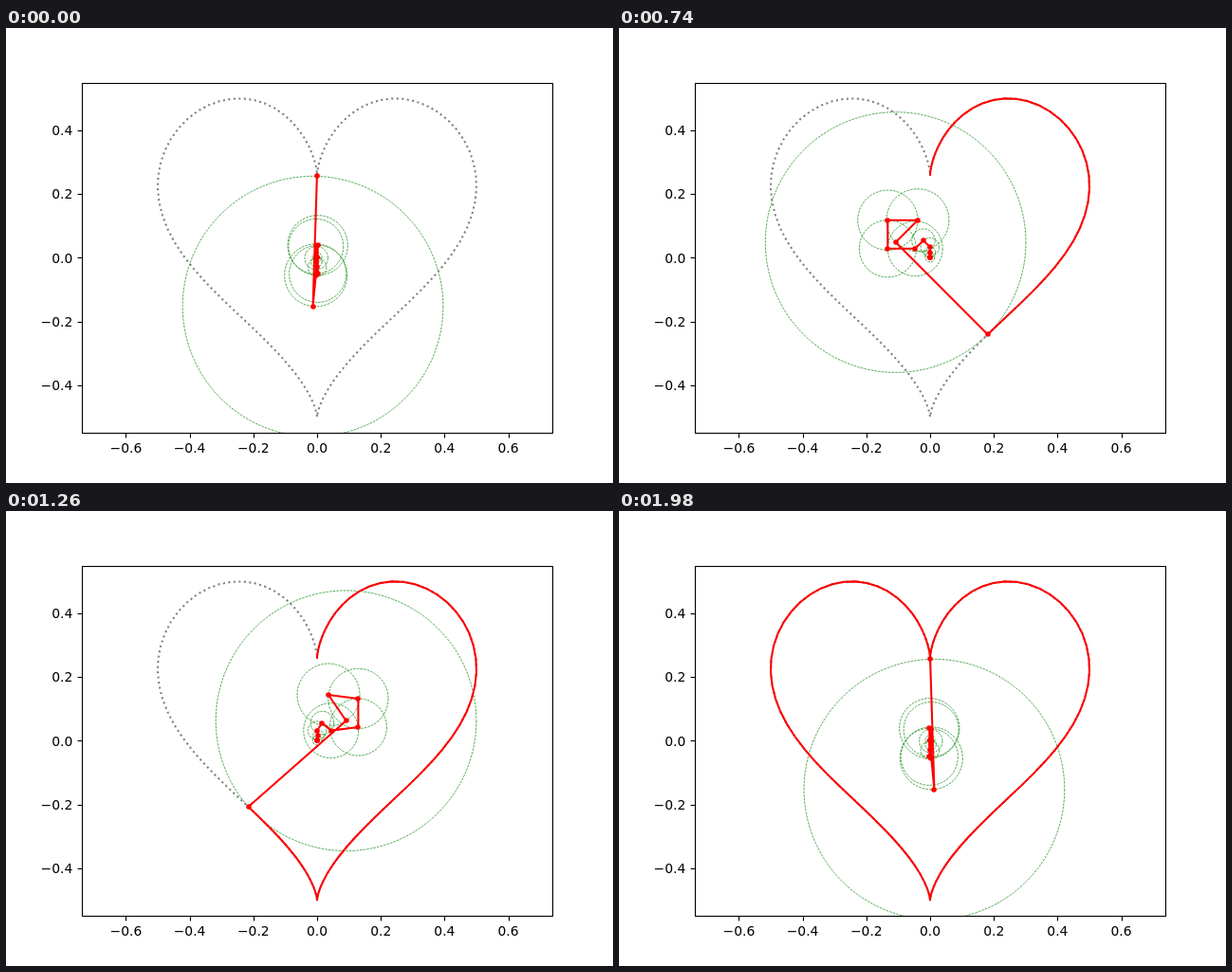
An HTML page that plays this animation: 640x480 px, repeating every 2 s.

```html
<!DOCTYPE html>
<html lang="en">
<head>
<meta charset="utf-8">
<title>Heart drawn by epicycles</title>
<style>
  html, body { margin: 0; width: 100%; height: 100%; overflow: hidden; background: #fff; }
  svg { display: block; }
  text { font: 13.89px "DejaVu Sans", sans-serif; }
  .line { fill: none; stroke: red; stroke-width: 2.08; stroke-linejoin: round; stroke-linecap: square; }
  .axis { fill: none; stroke: #000; stroke-width: 1.11; }
</style>
</head>
<body>
<svg id="stage" width="640" height="480" viewBox="0 0 640 480">
  <defs><clipPath id="plot"><rect x="80" y="57.6" width="496" height="369.6"/></clipPath></defs>
  <g id="chart" clip-path="url(#plot)"></g>
  <g id="axes"><rect class="axis" x="80.5" y="58.5" width="496" height="369"/></g>
</svg>
<script>
const STEPS = 100, STEP_MS = 20, ORDER = 5, SCALE = 336;
const TAU = 2 * Math.PI;
const px = x => 328 + x * SCALE;
const py = y => 242.4 - y * SCALE;
const chart = document.getElementById('chart');
const axes = document.getElementById('axes');

function add(parent, tag, attrs) {
  const el = document.createElementNS('http://www.w3.org/2000/svg', tag);
  for (const name in attrs) el.setAttribute(name, attrs[name]);
  return parent.appendChild(el);
}

const polyline = points =>
  points.map(([x, y]) => px(x).toFixed(2) + ',' + py(y).toFixed(2)).join(' ');

// Stretch values to the range -0.5 to 0.5.
function normalise(values) {
  const low = Math.min(...values), high = Math.max(...values);
  return values.map(v => (v - low) / (high - low) - 0.5);
}

const angles = Array.from({ length: STEPS }, (_, k) => TAU * k / (STEPS - 1));
const xs = normalise(angles.map(t => 16 * Math.sin(t) ** 3));
const ys = normalise(angles.map(t =>
  13 * Math.cos(t) - 5 * Math.cos(2 * t) - 2 * Math.cos(3 * t) - Math.cos(4 * t)));
const heart = xs.map((x, k) => [x, ys[k]]);

// Discrete Fourier coefficient for one frequency, in polar form.
function coefficient(freq) {
  let re = 0, im = 0;
  heart.forEach(([x, y], k) => {
    const a = -TAU * freq * k / STEPS;
    re += x * Math.cos(a) - y * Math.sin(a);
    im += x * Math.sin(a) + y * Math.cos(a);
  });
  return { freq, radius: Math.hypot(re, im) / STEPS, phase: Math.atan2(im, re) };
}

const arms = Array.from({ length: 2 * ORDER + 1 }, (_, i) => coefficient(i - ORDER))
  .sort((a, b) => a.radius - b.radius);

const circles = arms.map(arm => add(chart, 'circle', {
  r: arm.radius * SCALE, fill: 'none', stroke: 'green',
  'stroke-width': 0.69, 'stroke-dasharray': '2.57 1.11'
}));
add(chart, 'polyline', {
  points: polyline(heart), fill: 'none', stroke: 'gray', 'stroke-width': 2.08,
  'stroke-dasharray': '2.08 3.44', 'stroke-linejoin': 'round'
});
const trace = add(chart, 'polyline', { class: 'line' });
const chain = add(chart, 'polyline', { class: 'line' });
const dots = Array.from({ length: arms.length + 1 }, () =>
  add(chart, 'circle', { r: 2.78, fill: 'red' }));

function label(value, x, y, anchor) {
  const text = value.toFixed(1).replace('-', '\u2212');
  add(axes, 'text', { x, y, 'text-anchor': anchor }).textContent = text;
}

for (let i = -3; i <= 3; i++) {
  const x = px(i / 5);
  add(axes, 'path', { class: 'axis', d: `M${Math.round(x) + 0.5} 427.5v5` });
  label(i / 5, x, 448, 'middle');
}
for (let i = -2; i <= 2; i++) {
  const y = py(i / 5);
  add(axes, 'path', { class: 'axis', d: `M80.5 ${Math.round(y) + 0.5}h-5` });
  label(i / 5, 70.3, Math.round(y + 5.2), 'end');
}

function draw(ms) {
  const step = Math.floor(ms / STEP_MS + 1e-3) % STEPS;
  const joints = [[0, 0]];
  arms.forEach(({ freq, radius, phase }, i) => {
    const [x, y] = joints[i];
    const a = TAU * freq * step / STEPS + phase;
    circles[i].setAttribute('cx', px(x));
    circles[i].setAttribute('cy', py(y));
    joints.push([x + radius * Math.cos(a), y + radius * Math.sin(a)]);
  });
  joints.forEach(([x, y], i) => {
    dots[i].setAttribute('cx', Math.round(px(x)));
    dots[i].setAttribute('cy', Math.round(py(y)));
  });
  chain.setAttribute('points', polyline(joints));
  trace.setAttribute('points', step ? polyline(heart.slice(0, step + 1)) : '');
}

const start = performance.now();
function tick() {
  draw(performance.now() - start);
  requestAnimationFrame(tick);
}
tick();
</script>
</body>
</html>
```
